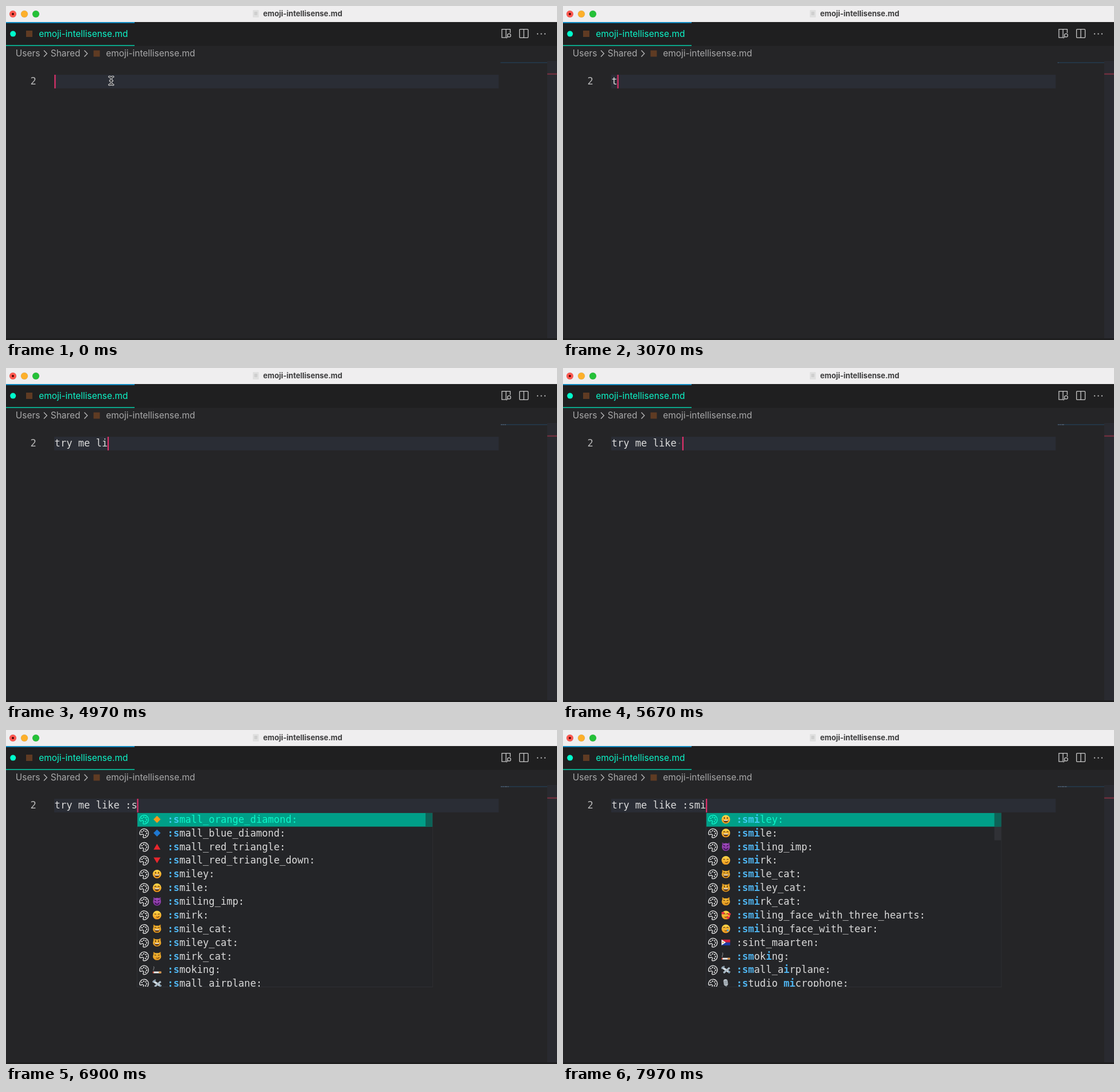
An HTML page with a canvas for the animation above (8 s loop, 960 by 583 pixels).

```html
<!DOCTYPE html>
<html lang="en">
<head>
<meta charset="utf-8">
<title>Emoji completion</title>
<style>
html, body { margin: 0; width: 100%; height: 100%; overflow: hidden; background: #252527; }
canvas { display: block; width: 960px; height: 583px; }
</style>
</head>
<body>
<canvas id="stage" width="960" height="583"></canvas>
<script>
const ctx = document.getElementById('stage').getContext('2d');
const LOOP = 8000;
const UI = 'Inter, "Open Sans", sans-serif';
const LABEL = `15.45px ${UI}`;
const MONO = '17.1px "DejaVu Sans Mono", "Noto Sans Mono", monospace';
const FILE = 'emoji-intellisense.md';
const TEXT = 'try me like :smi';
const TEXT_X = 84.6;
const ROW = 23.87;
const CSS_PX = ROW / 22; // the popup's left edge snaps to whole CSS pixels

// Time at which each character of TEXT is typed.
const KEYS = [2870, 3200, 3300, 3670, 4000, 4170, 4730, 4830, 4970, 5070, 5200, 5600, 6470, 6830, 7070, 7600];
const POPUP_AT = 6570;

const DIGITS = ['zero', 'one', 'two', 'three', 'four', 'five', 'six', 'seven', 'eight', 'nine'];
const KEYCAPS = [['hash', 'key', '#'], ['asterisk', 'key', '*'],
  ...DIGITS.map((name, i) => [name, 'key', String(i)]), ['copyright', 'sign', '©']];
const SMILES = [['smiley', 'face', 'open'], ['smile', 'face', 'happy'], ['smiling_imp', 'imp'],
  ['smirk', 'face', 'smirk'], ['smile_cat', 'cat', 'happy'], ['smiley_cat', 'cat', 'open'], ['smirk_cat', 'cat', 'smirk']];
const SMALL = [['small_orange_diamond', 'diamond', '#f79a1c'], ['small_blue_diamond', 'diamond', '#1f78d1'],
  ['small_red_triangle', 'triangle', -1], ['small_red_triangle_down', 'triangle', 1],
  ...SMILES, ['smoking', 'smoking'], ['small_airplane', 'plane']];
const SMI = [...SMILES, ['smiling_face_with_three_hearts', 'face', 'hearts'], ['smiling_face_with_tear', 'face', 'tear'],
  ['sint_maarten', 'flag'], ['smoking', 'smoking'], ['small_airplane', 'plane'], ['studio_microphone', 'mic']];

function rect(x, y, w, h, color) {
  ctx.fillStyle = color;
  ctx.fillRect(x, y, w, h);
}

function roundRect(x, y, w, h, r, color) {
  ctx.beginPath();
  ctx.roundRect(x, y, w, h, r);
  ctx.fillStyle = color;
  ctx.fill();
}

function oval(x, y, rx, color, ry = rx) {
  ctx.beginPath();
  ctx.ellipse(x, y, rx, ry, 0, 0, Math.PI * 2);
  ctx.fillStyle = color;
  ctx.fill();
}

function path(points, close) {
  ctx.beginPath();
  points.forEach(([x, y]) => ctx.lineTo(x, y));
  if (close) ctx.closePath();
}

function poly(points, color) {
  path(points, true);
  ctx.fillStyle = color;
  ctx.fill();
}

function stroke(color, width = 1) {
  ctx.strokeStyle = color;
  ctx.lineWidth = width;
  ctx.stroke();
}

function line(points, color, width) {
  path(points);
  stroke(color, width);
}

function arc(x, y, r, from, to, color, width) {
  ctx.beginPath();
  ctx.arc(x, y, r, from, to);
  stroke(color, width);
}

function label(text, x, y, font, color, align = 'left') {
  ctx.font = font;
  ctx.fillStyle = color;
  ctx.textAlign = align;
  ctx.fillText(text, x, y);
}

function expression(mood) {
  const ink = '#633a10';
  if (mood === 'open') {
    oval(-2.6, -2.4, 1, ink, 1.7);
    oval(2.6, -2.4, 1, ink, 1.7);
  } else if (mood === 'smirk') {
    line([[-4.6, -2], [-1.4, -1.6]], ink, 1.2);
    line([[1.4, -1.6], [4.6, -2]], ink, 1.2);
  } else {
    arc(-2.8, -1.2, 1.5, Math.PI, 0, ink, 1.1);
    arc(2.8, -1.2, 1.5, Math.PI, 0, ink, 1.1);
  }
  if (mood === 'open' || mood === 'happy') {
    ctx.beginPath();
    ctx.arc(0, 1.1, 4.5, 0, Math.PI);
    ctx.fillStyle = ink;
    ctx.fill();
    rect(-3.7, 1.1, 7.4, 1.4, '#fff');
  } else {
    arc(mood === 'smirk' ? 1 : 0, 0.8, 3, 0.3, 2.4, ink, 1.1);
  }
}

function heart(x, y) {
  oval(x - 1.1, y, 1.6, '#ef3340');
  oval(x + 1.1, y, 1.6, '#ef3340');
  poly([[x - 2.5, y + 0.6], [x + 2.5, y + 0.6], [x, y + 3.4]], '#ef3340');
}

function shade(from, to) {
  const g = ctx.createLinearGradient(0, -7.5, 0, 7.5);
  g.addColorStop(0, from);
  g.addColorStop(1, to);
  return g;
}

function ears(color) {
  for (const s of [-1, 1]) poly([[6.5 * s, 0], [6.3 * s, -7.5], [s, -4.5]], color);
}

const GLYPHS = {
  key(symbol) {
    roundRect(-8, -7.5, 15.5, 15, 2, shade('#6fa9c9', '#386c93'));
    label(symbol, -0.2, symbol === '*' ? 7 : 4.3, `700 ${symbol === '*' ? 17 : 12}px ${UI}`, '#fff', 'center');
  },
  sign(symbol) { label(symbol, -9, 5.5, MONO, '#d6d6d6'); },
  diamond(color) { poly([[0, -6.2], [6.2, 0], [0, 6.2], [-6.2, 0]], color); },
  triangle(dir) { poly([[0, 5 * dir], [6, -5 * dir], [-6, -5 * dir]], '#e8262d'); },
  face(mood) {
    oval(0, 0, 7.5, shade('#ffd84a', '#f2981c'));
    expression(mood);
    if (mood === 'hearts') [[-5, -4], [6, -2], [4, 4]].forEach(p => heart(...p));
    if (mood === 'tear') oval(3.4, 2.8, 1.4, '#46a8f0', 2);
  },
  cat(mood) {
    ears('#d9921f');
    oval(0, 0.8, 7.2, shade('#f8c33c', '#e0921c'), 6.3);
    expression(mood);
  },
  imp() {
    ears('#7b3595');
    oval(0, 0.6, 6.9, shade('#a34fc0', '#83339c'));
    line([[-4.5, -2.5], [-1.3, -0.8]], '#34104c', 1.4);
    line([[4.5, -2.5], [1.3, -0.8]], '#34104c', 1.4);
    arc(0, 1.2, 3.7, 0.2, 2.94, '#34104c', 1.5);
  },
  smoking() {
    rect(-6, 3, 13, 3, '#ededed');
    rect(3, 3, 4.5, 3, '#d9913f');
    rect(-7.5, 3, 1.8, 3, '#d94b35');
    ctx.beginPath();
    ctx.moveTo(-6, 1.5);
    ctx.bezierCurveTo(-8, -2, -3, -2, -6, -6);
    stroke('#77797c', 1.2);
  },
  plane() {
    line([[-7, -4.5], [7, 5]], '#d4dde3', 3.6);
    line([[6.5, -3.5], [-4, 5.5]], '#a9bac6', 3.2);
    line([[-7.5, -2], [-2.5, -6.5]], '#8ea4b5', 2.2);
    oval(5.5, 4, 1.3, '#4c7794');
  },
  flag() {
    rect(-7.5, -5, 15, 5, '#d4213d');
    rect(-7.5, 0, 15, 5, '#1b3da8');
    poly([[-7.5, -5], [0, 0], [-7.5, 5]], '#f4f4f4');
    oval(-5, 0, 1.3, '#d69d46');
  },
  mic() {
    ctx.save();
    ctx.rotate(-0.15);
    roundRect(-3.6, -7.5, 7.2, 11.5, 3.4, '#bdc5cc');
    for (let y = -4.5; y < 2; y += 2.4) rect(-3, y, 6, 0.9, '#69737c');
    rect(-1, 4, 2, 3, '#7c868e');
    rect(-3.5, 6.3, 7, 1.5, '#9aa4ac');
    ctx.restore();
  }
};

function palette(x, y, color) {
  ctx.save();
  ctx.translate(x, y);
  ctx.beginPath();
  ctx.arc(0, 0, 7.7, Math.PI * 0.55, Math.PI * 0.95, true);
  ctx.bezierCurveTo(-7.3, 3.6, -5, 2.2, -3.8, 1.7);
  ctx.bezierCurveTo(-1.8, 1.2, -0.2, 2.4, -1, 4.2);
  ctx.bezierCurveTo(-1.8, 6, -2.3, 7, -1.2, 7.6);
  stroke(color, 1.4);
  [[-3.8, -2.2], [-0.6, -4.4], [3, -3.2], [4.4, 0.3], [2.6, 3.7]].forEach(([px, py]) => oval(px, py, 1.2, color));
  ctx.restore();
}

// Indices of the query's characters in the label, empty when they do not all occur in order.
function matches(text, query) {
  const found = new Set();
  let from = 0;
  for (const c of query) {
    const at = text.indexOf(c, from);
    if (at < 0) return new Set();
    found.add(at);
    from = at + 1;
  }
  return found;
}

function popup(typed, cell) {
  const query = typed.slice(typed.indexOf(':'));
  const rows = query === ':' ? KEYCAPS : query === ':smi' ? SMI : SMALL;
  const left = Math.ceil((TEXT_X + typed.length * cell) / CSS_PX) * CSS_PX;
  const top = 144.8;
  rect(left - 0.8, top - 0.8, 515.4, 305, '#343539');
  rect(left, top, 514, 303.5, '#242528');
  ctx.save();
  ctx.beginPath();
  ctx.rect(left, top, 514, 303.3);
  ctx.clip();
  rect(left, top, 514, ROW, '#009f88');
  const thumb = rows === SMI ? 2 * ROW : ROW;
  rect(left + 502, top + ROW, 12, thumb - ROW, '#303136');
  rect(left + 502, top, 12, ROW, '#0d6257');

  rows.forEach(([name, kind, detail], i) => {
    const mid = 156.4 + i * ROW;
    const color = i ? '#dadada' : '#0cf5c8';
    palette(left + 11.7, mid, i ? '#e0e0e0' : color);
    ctx.save();
    ctx.translate(left + 34.2, mid - 0.4);
    GLYPHS[kind](detail);
    ctx.restore();
    const text = `:${name}:`;
    const hits = matches(text, query);
    const x = left + (kind === 'sign' ? 46 : 52.4);
    [...text].forEach((c, k) => {
      const hit = hits.has(k);
      label(c, x + k * cell, mid + 5.4, (hit ? '700 ' : '') + MONO, hit ? (i ? '#4fb4ef' : '#3ccaf0') : color);
    });
  });
  ctx.restore();
}

function toolbar() {
  const c = '#c8c8c8';
  ctx.beginPath();
  ctx.roundRect(894.7, 40.7, 15, 14.6, 1);
  stroke(c, 1.3);
  line([[902.2, 41], [902.2, 55]], c, 1.3);
  line([[871, 55.2], [864, 55.2], [864, 40.7], [878.5, 40.7], [878.5, 47]], c, 1.3);
  line([[871.2, 41], [871.2, 55]], c, 1.3);
  arc(876.5, 51.3, 2.9, 0, Math.PI * 2, c, 1.3);
  line([[874.4, 53.4], [871.6, 56.4]], c, 1.3);
  [926.2, 932.6, 939].forEach(x => oval(x, 48.7, 1.1, c));
}

function chrome() {
  rect(0, 0, 960, 583, '#252527');
  rect(0, 0, 960, 28, '#efeeef');
  [[12, '#fe5850'], [32, '#fdb02b'], [52, '#25c138']].forEach(([x, color]) => {
    oval(x, 14, 6, color);
    stroke('rgba(0, 0, 0, 0.12)', 0.7);
  });
  oval(12, 14, 2, '#4a0805');
  roundRect(430, 7, 10.5, 13, 1, '#e0e0e0');
  roundRect(432.5, 10, 5.5, 6, 1, '#cfcfcf');
  label(FILE, 517, 18.2, `700 13px ${UI}`, '#3b3b3c', 'center');

  rect(0, 28, 960, 41.5, '#1f1f20');
  rect(0, 28, 224, 2, '#0d86bd');
  rect(0, 68.2, 224, 1.5, '#06cfaa');
  oval(12.2, 48.6, 5, '#00ffcc');
  rect(35, 43, 11, 11, '#5f3b23');
  label(FILE, 57.2, 54, LABEL, '#0cf5c8');
  toolbar();

  label('Users', 16.8, 88, LABEL, '#a9a9aa');
  label('Shared', 77.8, 88, LABEL, '#a9a9aa');
  label(FILE, 174.2, 88, LABEL, '#a9a9aa');
  [66, 136.5].forEach(x => line([[x, 77.5], [x + 5.3, 83], [x, 88.5]], '#b4b4b5', 1.4));
  rect(152.5, 77.5, 11, 11, '#5f3b23');

  rect(943, 96, 17, 484, '#292a30');
  rect(943, 117.6, 17, 2.2, '#76303f');
  rect(861.5, 98, 81.5, 1.6, '#24394c');
  rect(84, 120, 774.5, 23.8, '#2a2d35');
  rect(0, 580, 960, 3, '#1e1e1f');
  label('2', 42.4, 137.2, MONO, '#b8b8b8');
}

function pointer(x, y) {
  const shape = () => {
    ctx.beginPath();
    for (const s of [-1, 1]) {
      ctx.moveTo(x - 3.5, y + 7 * s);
      ctx.quadraticCurveTo(x, y + 7 * s, x, y + 4 * s);
      ctx.quadraticCurveTo(x, y + 7 * s, x + 3.5, y + 7 * s);
    }
    ctx.moveTo(x, y - 5);
    ctx.lineTo(x, y + 5);
    ctx.moveTo(x - 2, y);
    ctx.lineTo(x + 2, y);
  };
  ctx.lineCap = 'round';
  shape();
  stroke('#e4e4e4', 3.4);
  shape();
  stroke('#17181b', 1.3);
  ctx.lineCap = 'butt';
}

function caretVisible(t, count) {
  if (count) return t - KEYS[count - 1] < 490;
  return t < 70 || Math.floor((t - 70) / 500) % 2 === 1;
}

function draw(t) {
  chrome();
  ctx.font = MONO;
  const cell = ctx.measureText('m').width;
  const count = KEYS.filter(k => k <= t).length;
  const typed = TEXT.slice(0, count);
  const caretX = TEXT_X + count * cell;

  label(typed, TEXT_X, 137.2, MONO, '#dadada');
  if (typed.endsWith(' ')) oval(caretX - cell / 2, 131.5, 1.3, '#55575c');
  [...typed].forEach((c, i) => {
    if (c !== ' ') rect(862.5 + i * 0.95, 98.2, 0.8, 1.3, '#647180');
  });
  if (!count) pointer(183.3, 130.5);
  if (t >= POPUP_AT) popup(typed, cell);
  if (caretVisible(t, count)) rect(caretX - 0.3, 120, 2.2, 23.8, '#e0306a');
}

function tick() {
  draw(performance.now() % LOOP);
  requestAnimationFrame(tick);
}
tick();
</script>
</body>
</html>
```
